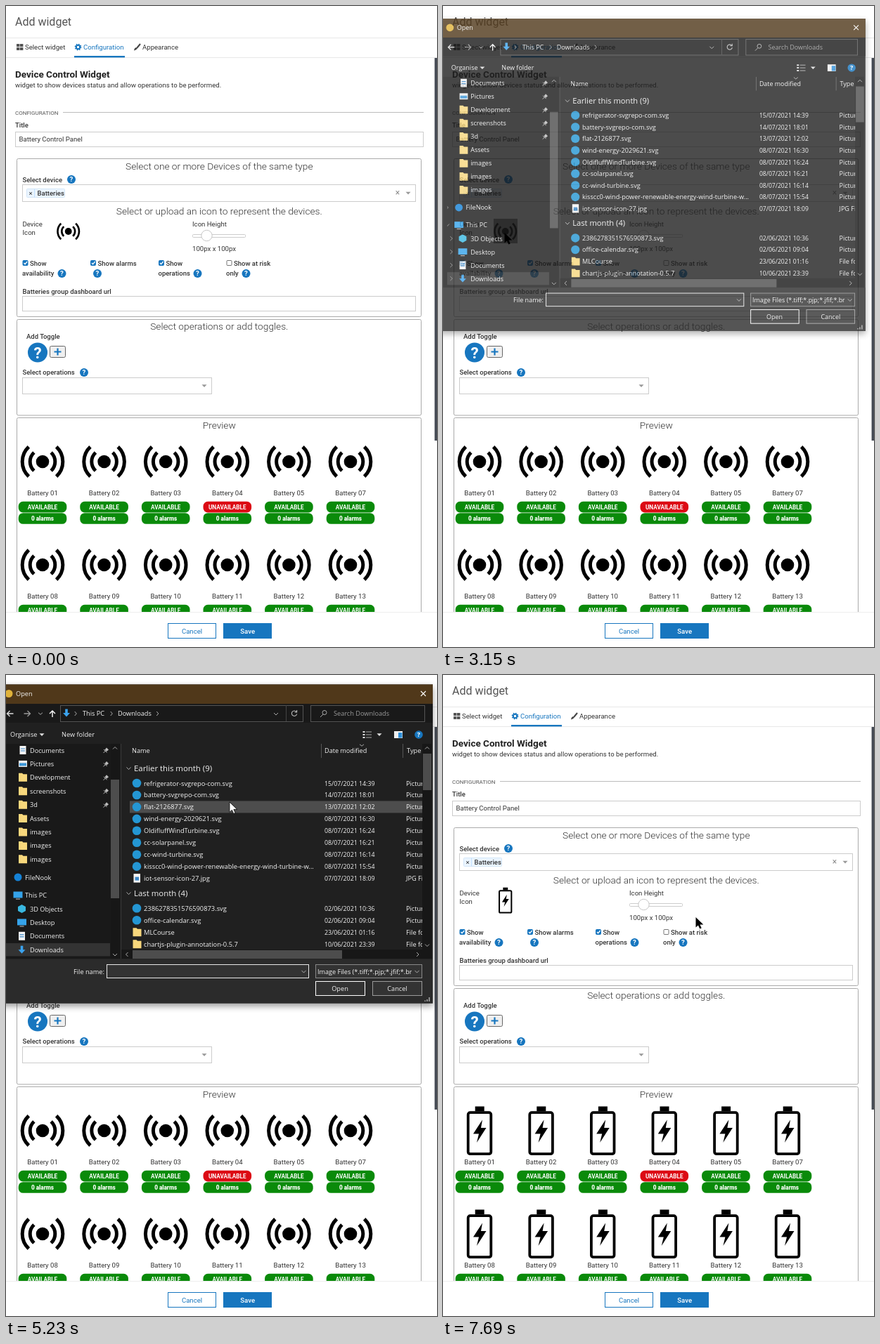
Write an HTML page that moves like this. It is 613x913 px and loops after 8000 ms.

```html
<!DOCTYPE html>
<html lang="en">
<head>
<meta charset="utf-8">
<title>Add widget</title>
<style>
  html, body { margin: 0; height: 100%; overflow: hidden; background: #fff; }
  svg { display: block; width: 100vw; height: 100vh; }
  .page text { font-family: Roboto, Arial, sans-serif; }
  .dialog text { font-family: "Open Sans", "Noto Sans", sans-serif; }
  .dialog { filter: drop-shadow(0 4px 5px rgba(0, 0, 0, .4)); }
</style>
</head>
<body>
<svg id="stage" viewBox="0 0 613 913" xmlns="http://www.w3.org/2000/svg"></svg>
<script>
const BLUE = '#1776bf';

// Drawing helpers
const text = (x, y, s, size = 9.6, fill = '#333', more = '') =>
  `<text x="${x}" y="${y}" font-size="${size}" fill="${fill}" ${more}>${s}</text>`;
const label = (x, y, s) => text(x, y, s, 9.5, '#333', 'font-weight="500"');
const mid = 'text-anchor="middle"';
const rect = (x, y, w, h, fill, stroke = 'none', r = 0, more = '') =>
  `<rect x="${x}" y="${y}" width="${w}" height="${h}" fill="${fill}" stroke="${stroke}" rx="${r}" ${more}/>`;
const path = (d, stroke, w = 1, fill = 'none') =>
  `<path d="${d}" stroke="${stroke}" stroke-width="${w}" fill="${fill}"/>`;
const dot = (x, y, r, fill, stroke = 'none') =>
  `<circle cx="${x}" cy="${y}" r="${r}" fill="${fill}" stroke="${stroke}"/>`;
const help = (x, y, r = 6) =>
  dot(x, y, r, BLUE) + text(x, y + r * 0.58, '?', r * 1.6, '#fff', mid + ' font-weight="700"');
const caret = (x, y, fill) => path(`M${x - 3.5} ${y - 1.7}h7l-3.5 3.7z`, 'none', 0, fill);
const chevron = (x, y, dx, dy, stroke = '#aaa') => dx
  ? path(`M${x - dx} ${y - 3}l${2 * dx} 3l${-2 * dx} 3`, stroke)
  : path(`M${x - 3} ${y - dy}l3 ${2 * dy}l3 ${-2 * dy}`, stroke);

// Two arcs on either side of the centre, spanning 47 degrees up and down
function waves(r) {
  const x = r * Math.cos(0.82), y = r * Math.sin(0.82);
  return [1, -1].map(s => path(
    `M${s * x} ${-y}A${r} ${r} 0 0 ${s > 0 ? 1 : 0} ${s * x} ${y}`, '#000', 5)).join('');
}

const defs = `<defs>
  <g id="sensor">${dot(0, 0, 9.3, '#000')}${waves(17.8)}${waves(28.8)}</g>
  <g id="battery">${rect(-16.3, -25.8, 32.6, 59, 'none', '#000', 3, 'stroke-width="3.8"')}
    ${rect(-6.3, -34.5, 13, 7, '#000')}${path('M4-15.5L-9 4.5H-1L-4 17L9.5-4H2z', 'none', 0, '#000')}</g>
  <clipPath id="body"><path d="M0 0H613V863H0z"/></clipPath>
  <clipPath id="list"><path d="M164 98H592V391H164z"/></clipPath>
  <clipPath id="side"><path d="M0 98H163V404H0z"/></clipPath>
  <clipPath id="types"><path d="M440 412H577V432H440z"/></clipPath>
</defs>`;

const icon = (x, y, scale = 1) => ['sensor', 'battery'].map(id =>
  `<use href="#${id}" class="${id}" transform="translate(${x} ${y}) scale(${scale})"/>`).join('');

function check(x, on, first, second, helpX) {
  return rect(x + 0.5, 362.5, 7, 7, on ? BLUE : '#fff', on ? BLUE : '#777', 1) +
    (on ? path(`M${x + 2} 366l1.6 1.8l3-3.8`, '#fff', 1.3) : '') +
    label(x + 10.5, 370, first) + label(x - 0.5, 384, second) + help(helpX, 381);
}

function tile(name, i) {
  const x = 52 + (i % 6) * 87.6, y = i < 6 ? 0 : 147;
  const down = name === '04';
  const badge = (top, s, fill, weight) => rect(x - 34.3, top + y, 68.6, 15.6, fill, 'none', 6.5) +
    text(x, top + y + 10.7, s, 8.2, '#fff', `${mid} font-weight="${weight}"`);
  return icon(x, 649 + y) + text(x, 697 + y, 'Battery ' + name, 9.6, '#333', mid) +
    badge(705.8, down ? 'UNAVAILABLE' : 'AVAILABLE', down ? '#dc0a14' : '#0a8a0a', 700) +
    badge(722.2, '0 alarms', '#0a8a0a', 900);
}

function page() {
  const heading = (y, s) => text(303.3, y, s, 13.7, '#333', mid + ' font-weight="300"');
  const field = (x, y, w, h) => rect(x + 0.5, y + 0.5, w, h, '#fff', '#ccc');
  const group = (y, h) => rect(15.5, y + 0.5, 575, h, '#fff', '#aaa', 2);
  const names = ['01', '02', '03', '04', '05', '07', '08', '09', '10', '11', '12', '13'];
  return '<g class="page">' + rect(0, 0, 613, 913, '#fff') +
    text(13, 27.5, 'Add widget', 16, '#555') +
    path('M0 45.5H613M0 73.5H613', '#e8e8e8') + rect(97, 71, 72, 2.4, BLUE) +
    [[15, 54], [20, 54], [15, 59], [20, 59]].map(p => rect(...p, 4.4, 4, '#555')).join('') +
    text(27, 62, 'Select widget') + text(110, 62, 'Configuration', 9.6, BLUE) + text(194, 62, 'Appearance') +
    `<circle cx="102.5" cy="58.5" r="4" fill="none" stroke="${BLUE}" stroke-width="1.8" stroke-dasharray="1.57"/>` +
    `<circle cx="102.5" cy="58.5" r="2.7" fill="none" stroke="${BLUE}" stroke-width="2"/>` +
    path('M186 60L191 54', '#444', 2) + path('M182 63.5q1-5 4-4q2 2-4 4z', 'none', 0, '#444') +
    rect(609.6, 74, 3.4, 545, '#454a54') +
    text(13, 102.3, 'Device Control Widget', 13.5, '#222', 'font-weight="700"') +
    text(13, 115.5, 'widget to show devices status and allow operations to be performed.') +
    text(13, 154.5, 'CONFIGURATION', 8, '#555') + path('M81 151.5H594', '#bbb') +
    label(13, 173, 'Title') + field(13, 179, 580, 21) + text(18.5, 193, 'Battery Control Panel') +

    group(217, 225) + heading(233, 'Select one or more Devices of the same type') +
    label(23.5, 250.5, 'Select device') + help(93, 247) + field(23, 254, 559, 24) +
    rect(29.5, 260.5, 54, 12, '#ebf5ff', '#d3e6f8', 1) + path('M40.5 260.5v12', '#c2e0ff') +
    text(35, 269.6, '×', 9.6, '#333', mid) + label(44.5, 270, 'Batteries') +
    text(557, 270, '×', 12, '#888', mid) + caret(572, 266.5, '#999') +
    heading(296.5, 'Select or upload an icon to represent the devices.') +
    text(23.5, 313.5, 'Device') + text(23.5, 326, 'Icon') +
    `<rect id="hover" x="72" y="303" width="34" height="35" fill="#858585"/>` + icon(88.7, 321, 0.53) +
    text(265, 313.5, 'Icon Height') + rect(265.5, 325.5, 75, 4, '#fff', '#ccc', 1) +
    dot(285.5, 327, 7.7, '#fff', '#c8c8c8') + text(265, 349, '100px x 100px') +
    check(23.5, 1, 'Show', 'availability', 79.5) + check(120, 1, 'Show alarms', '', 130) +
    check(217, 1, 'Show', 'operations', 272.5) + check(313.5, 0, 'Show at risk', 'only', 341.5) +
    label(23.5, 410, 'Batteries group dashboard url') + field(23, 413, 559, 21) +

    group(446, 136.5) + heading(461, 'Select operations or add toggles.') +
    label(29, 474, 'Add Toggle') + help(45, 493.5, 14) +
    rect(62.5, 484.5, 22, 16, '#efefef', '#666', 2) + path('M73.5 487.5v10M68.5 492.5h10', BLUE, 2.2) +
    label(23.5, 525, 'Select operations') + help(111, 522) + field(23, 529, 269, 23) + caret(282, 541, '#999') +

    '<g clip-path="url(#body)">' + group(586, 320) + heading(601.5, 'Preview') +
    names.map(tile).join('') + '</g>' +
    path('M0 863.5H613', '#eee') +
    rect(230.5, 879.5, 68, 21, '#fff', BLUE) + text(264.5, 893.5, 'Cancel', 9.6, BLUE, mid) +
    rect(309, 879, 69, 22, BLUE) + text(343.7, 893.5, 'Save', 9.6, '#fff', mid + ' font-weight="500"') + '</g>';
}

const FILES = [
  ['refrigerator-svgrepo-com.svg', '15/07/2021 14:39'],
  ['battery-svgrepo-com.svg', '14/07/2021 18:01'],
  ['flat-2126877.svg', '13/07/2021 12:02'],
  ['wind-energy-2029621.svg', '08/07/2021 16:30'],
  ['OldifluffWindTurbine.svg', '08/07/2021 16:24'],
  ['cc-solarpanel.svg', '08/07/2021 16:21'],
  ['cc-wind-turbine.svg', '08/07/2021 16:14'],
  ['kisscc0-wind-power-renewable-energy-wind-turbine-w...', '08/07/2021 15:54'],
  ['iot-sensor-icon-27.jpg', '07/07/2021 18:09'],
  ['2386278351576590873.svg', '02/06/2021 10:36'],
  ['office-calendar.svg', '02/06/2021 09:04'],
  ['MLCourse', '23/06/2021 01:16'],
  ['chartjs-plugin-annotation-0.5.7', '10/06/2021 23:39']
];
const ROW = 16.95;
const rowY = i => i < 9 ? 154 + i * ROW : 332.3 + (i - 9) * ROW;

const folder = (x, y) => path(`M${x - 6} ${y - 6}h5l1.5 1.5h5.5v10.5h-12z`, 'none', 0, '#f7d77c');
const download = (x, y) => path(`M${x} ${y - 5.5}v7`, '#3ba3ee', 3.6) + path(`M${x - 5} ${y}h10l-5 5.5z`, 'none', 0, '#3ba3ee');
const white = (x, y, s, size = 9.2, more = '') => text(x, y, s, size, '#f2f2f2', more);

function fileRow([name, date], i) {
  const y = rowY(i), svg = /\.(svg|\.\.)$/.test(name), jpg = name.endsWith('.jpg');
  const mark = svg ? dot(186, y, 6.3, '#2496d3')
    : jpg ? rect(181.5, y - 6.5, 9.5, 12.5, '#f4f4f4') + rect(183.5, y - 2, 5.5, 5, '#3a87c8')
    : folder(186.5, y);
  return mark + white(196, y + 3.5, name, 9.32) + white(453, y + 3.5, date, 8.8) +
    white(569, y + 3.5, svg ? 'Picture' : jpg ? 'JPG File' : 'File folder');
}

function sidebar() {
  const quick = ['Documents', 'Pictures', 'Development', 'screenshots', '3d', 'Assets', 'images', 'images', 'images'];
  const pc = ['3D Objects', 'Desktop', 'Documents', 'Downloads'];
  const sheet = (x, y) => rect(x - 4.5, y - 6, 9, 12, '#f4f4f4') + path(`M${x - 3} ${y - 2}h6m-6 3h6`, '#3a87c8', 1.2);
  const screen = (x, y) => rect(x - 6.5, y - 5, 13, 9, '#35a3ea') + rect(x - 3, y + 5, 6, 1.2, '#aaa');
  const picture = (x, y) => rect(x - 6, y - 4.5, 12, 9, '#eee') + rect(x - 5, y - 1, 10, 4, '#3a96d8');
  const cube = (x, y) => path(`M${x} ${y - 6}l5.5 3v6l-5.5 3l-5.5-3v-6z`, 'none', 0, '#39b7e0');
  const pin = y => path(`M138.5 ${y + 4}l3-3m-2.5-2l4.5 4.5`, '#bbb') + path(`M140.5 ${y - 0.5}l2.5-3l3 3l-3 2.5z`, 'none', 0, '#bbb');
  let s = rect(0, 382, 148, 18.5, '#333');
  quick.forEach((name, i) => {
    const y = 107 + i * 19.42;
    s += ([sheet, picture][i] || folder)(24, y) + white(34, y + 3.5, name) + (i < 5 ? pin(y) : '');
  });
  s += dot(17, 288, 5.5, '#1582d6') + white(27, 291.5, 'FileNook') + screen(17, 313.5) + white(27, 317, 'This PC');
  pc.forEach((name, i) => {
    const y = 333 + i * 19.4;
    s += [cube, screen, sheet, download][i](22.5, y) + white(34, y + 3.5, name);
  });
  s += '<g id="twisties">' + pc.map((_, i) => chevron(6, 333 + i * 19.4, 1.6, 0, '#888')).join('') +
    chevron(0, 288, 1.6, 0, '#888') + chevron(0, 313.5, 0, 1.6, '#888') + '</g>';
  return `<g clip-path="url(#side)">${s}</g>`;
}

function dialog() {
  const arrow = (x, d, stroke) => path(`M${x + 4.5 * d} 55h${-9 * d}m${4 * d} -4l${-4 * d} 4l${4 * d} 4`, stroke, 1.3);
  const box = (x, y, w, h, fill, stroke) => rect(x + 0.5, y + 0.5, w, h, fill, stroke);
  return '<g class="dialog" id="dialog">' +
    rect(-12, 13.5, 619, 454, '#202020') + rect(-12, 13.5, 619, 27.5, '#50381a') +
    dot(4, 26.5, 5.5, '#e0b23a') + white(14, 30, 'Open') + path('M590 23l7 7m0-7l-7 7', '#fff', 1.1) +
    rect(-12, 41, 619, 27, '#191919') + arrow(6, 1, '#ddd') + arrow(30, -1, '#999') + chevron(49, 55, 0, 1.3) +
    path('M66 60v-9m-4 4l4-4l4 4', '#fff', 1.4) +
    box(77, 43, 345, 23, '#191919', '#555') + download(86, 54) + chevron(99, 55, 1.3, 0) +
    white(109, 58.3, 'This PC') + chevron(150, 55, 1.3, 0) + white(159, 58.3, 'Downloads') + chevron(215.5, 55, 1.3, 0) +
    chevron(384, 55.5, 0, 1.5) + path('M398.5 43v23', '#444') + path('M413 52.5a3.7 3.7 0 1 0 .7 3M413.6 50v3h-3', '#bbb', 1.1) +
    box(433, 43, 162, 23, '#191919', '#555') + `<circle cx="453" cy="53.5" r="3" fill="none" stroke="#aaa"/>` +
    path('M451 56l-4 4', '#aaa') + text(466, 58.3, 'Search Downloads', 9.2, '#999') +
    white(6, 88, 'Organise') + caret(51, 85, '#ddd') + white(79, 88, 'New folder') +
    path('M507.5 81h3m-3 4h3m-3 4h3', '#ddd', 2) + path('M512 81h8m-8 4h8m-8 4h8', '#aaa') + caret(531, 85, '#ddd') +
    rect(552, 80, 12, 10, '#f0f0f0') + rect(558, 82, 5.5, 7.5, '#2f8fd8') + help(587, 85, 5.8) +

    rect(-12, 98, 175, 306, '#191919') + sidebar() + rect(149, 98, 12, 306, '#171717') + rect(149, 149, 12, 169, '#4d4d4d') +
    chevron(155, 104, 0, -1.5) + chevron(155, 398.5, 0, 1.5) + path('M163.5 98V404', '#3a3a3a') +

    '<g clip-path="url(#list)">' + `<rect id="mark" x="176" width="416" height="${ROW}"/>` +
    white(179, 111, 'Name') + white(453, 111, 'Date modified', 9.1) + white(570, 111, 'Type') +
    path('M448.5 98v20M564.5 98v20', '#555') + chevron(506, 100, 0, 1.2) +
    chevron(174.5, 133, 0, 1.6) + white(182, 137, 'Earlier this month (9)', 11.4) +
    chevron(174.5, 311, 0, 1.6) + white(182, 315, 'Last month (4)', 11.4) + FILES.map(fileRow).join('') + '</g>' +
    rect(592, 98, 13, 293, '#171717') + rect(593, 112, 12, 52, '#4d4d4d') + chevron(599, 104, 0, -1.5) + chevron(599, 385, 0, 1.5) +
    rect(164, 391, 441, 13, '#171717') + rect(180, 392, 298, 12, '#4d4d4d') + chevron(172, 398, -1.5, 0) + chevron(585.5, 398, 1.5, 0) +

    rect(-12, 404.5, 619, 63, '#2b2b2b') + white(96, 425.5, 'File name:') +
    box(143, 412, 287, 19, '#333', '#e8e8e8') + chevron(423.5, 422.5, 0, 1.6) +
    `<path id="bar" d="M147.5 416v12" stroke="#fff"/><g id="chosen">${white(146.5, 425.5, FILES[1][0])}</g>` +
    box(440, 412, 151, 19, '#333', '#888') + '<g clip-path="url(#types)">' +
    white(443, 425.5, 'Image Files (*.tiff;*.pjp;*.jfif;*.br', 9.1) + '</g>' + chevron(584.5, 422.5, 0, 1.6) +
    box(440, 436, 70, 20, '#333', '#fff') + white(475, 450, 'Open', 9.2, mid) +
    box(521, 436, 70, 20, '#333', '#9b9b9b') + white(556.5, 450, 'Cancel', 9.2, mid) +
    path('M602 459v6m-3-3v3m-3 0v-1.5', '#aaa', 1.5) + '</g>';
}

document.getElementById('stage').innerHTML = defs + page() + dialog() +
  `<circle id="press" r="10" fill="#e6da1c" opacity=".8"/>
   <path id="cursor" d="M0 0V14.5L3.4 11.4L5.8 16.6L8.2 15.5L5.9 10.5H10.8z" stroke-width=".8"/>`;

const $ = id => document.getElementById(id);
const set = (id, attrs) => { for (const k in attrs) $(id).setAttribute(k, attrs[k]); };
const show = (id, on) => { $(id).style.display = on ? '' : 'none'; };
const within = (t, a, b) => t >= a && t < b;

// Cursor tip: time, x, y
const TRACK = [
  [260, 568, 910], [540, 578, 869], [985, 578, 869], [990, 582, 851], [1060, 592, 838], [1150, 545, 745],
  [1300, 330, 540], [1450, 110, 380], [1560, 32, 330], [1750, 86, 324], [1810, 86, 324], [1900, 87, 331],
  [2080, 87.5, 323], [3610, 87.5, 323], [3900, 190, 262], [4360, 352, 268], [4500, 363, 280.5],
  [4700, 352, 296], [5000, 325, 220], [5230, 318, 181], [5300, 316, 174], [6690, 316, 174],
  [6970, 359, 345], [7360, 358.5, 345], [7690, 359.5, 345], [8000, 359.5, 345]
];
// Dialog: time, opacity, scale, x shift, y shift
const FADE = [
  [0, 0, 1, 0, 0], [3020, 0.12, 1, -405, -206], [3085, 0.45, 0.95, 0, 0], [3150, 0.8, 0.98, 0, 0],
  [3220, 0.96, 0.995, 0, 0], [3285, 1, 1, 0, 0], [5826, 0.9, 0.995, 0, 0], [5885, 0.61, 0.98, 0, 0],
  [5960, 0.2, 0.96, 0, 0], [6025, 0, 1, 0, 0]
];

function tip(t) {
  const i = TRACK.findIndex(k => k[0] > t);
  if (i < 1) return [-50, -50];
  const [t0, x0, y0] = TRACK[i - 1], [t1, x1, y1] = TRACK[i];
  const p = (t - t0) / (t1 - t0);
  return [x0 + (x1 - x0) * p, y0 + (y1 - y0) * p];
}

function draw(now) {
  const t = now % 8000;
  const [x, y] = tip(t);
  const [, opacity, scale, dx, dy] = FADE.filter(k => k[0] <= t).pop();
  const dark = within(t, 3285, 5826);
  set('cursor', { transform: `translate(${x} ${y})`, fill: dark ? '#fff' : '#000', stroke: dark ? '#000' : 'none' });
  set('press', { cx: x, cy: y - 1 });
  show('press', within(t, 2610, 2880) || within(t, 5300, 5430) || within(t, 5690, 6025));

  show('dialog', opacity > 0);
  set('dialog', { opacity, transform: `translate(${297 + dx} ${240 + dy}) scale(${scale}) translate(-297 -240)` });
  const chosen = t >= 5300;
  const row = chosen ? 1 : Math.floor((y - 154) / ROW + 0.5);
  show('mark', x > 176 && row >= 0 && row < 9);
  set('mark', { y: rowY(row) - ROW / 2, fill: chosen ? '#777' : '#4d4d4d' });
  show('chosen', chosen);
  show('bar', !chosen && Math.floor((t - 3285) / 530) % 2 === 0);
  set('twisties', { opacity: Math.min(1, Math.max(0, (5000 - t) / 700)) });

  const swapped = t >= 5960;
  show('hover', within(t, 1700, 5960));
  document.querySelectorAll('.sensor').forEach(e => e.style.display = swapped ? 'none' : '');
  document.querySelectorAll('.battery').forEach(e => e.style.display = swapped ? '' : 'none');
}

const start = performance.now();
(function loop() {
  draw(performance.now() - start);
  requestAnimationFrame(loop);
})();
</script>
</body>
</html>
```
